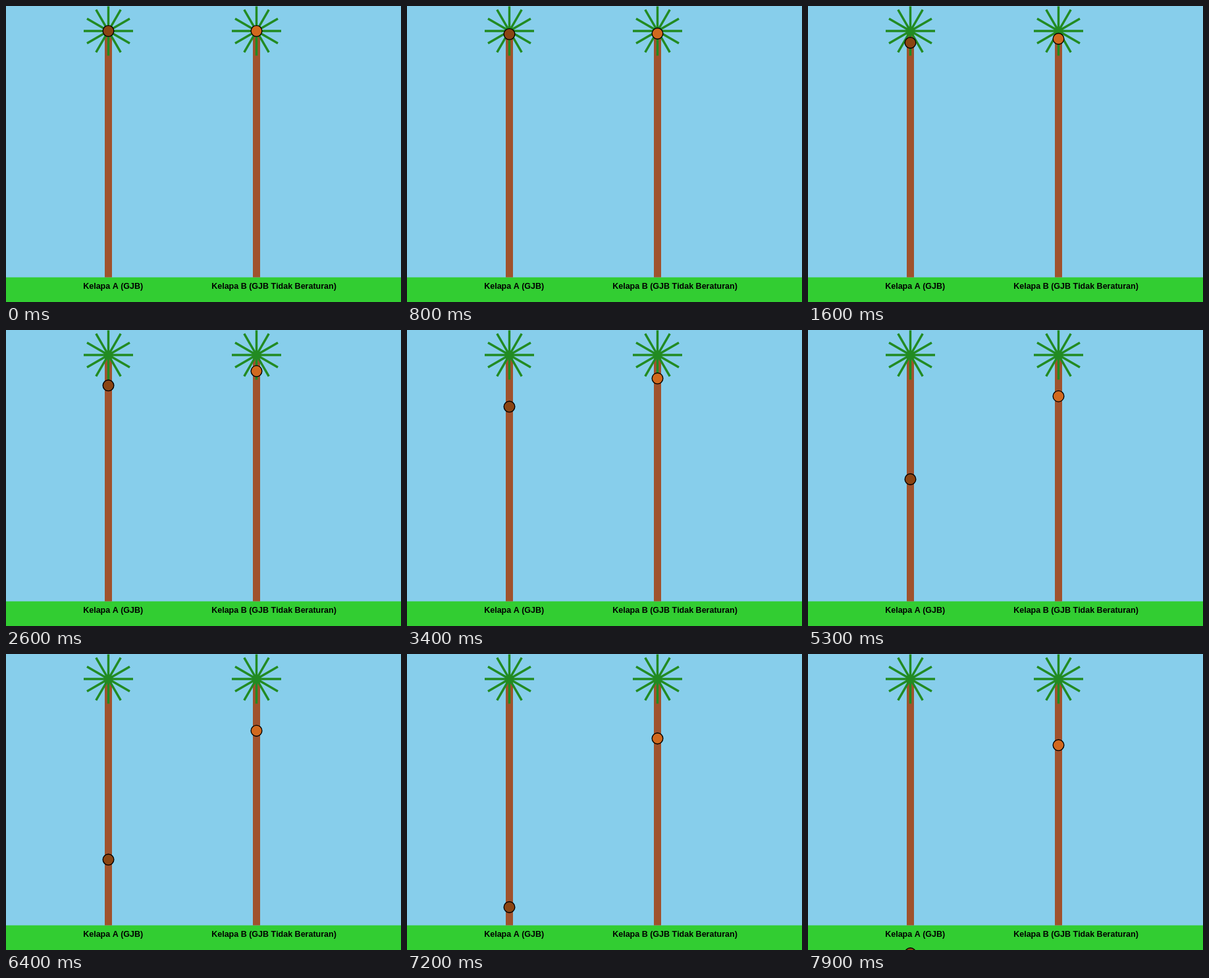
An HTML page with a canvas that plays this animation: 600 px wide and 450 px high, repeating every 8 s.

```html
<!DOCTYPE html>
<html lang="id">
<head>
<meta charset="utf-8">
<title>Kelapa jatuh</title>
<style>
  html, body { margin: 0; width: 100%; height: 100%; overflow: hidden; background: #87ceeb; }
  canvas { display: block; }
</style>
</head>
<body>
<canvas id="stage" width="600" height="450"></canvas>
<script>
const ctx = document.getElementById('stage').getContext('2d');
const LOOP = 8000, STEP = 100;
const GRAVITY = 0.132, DRAG = 0.0905;
const TOP = 38, GROUND = 412.5, FROND = 37.5;

const palms = [
  { x: 155.5, nut: '#8b4513', fall: freeFall, label: 'Kelapa A (GJB)', labelX: 117.2 },
  { x: 380.5, nut: '#d2691e', fall: dragFall, label: 'Kelapa B (GJB Tidak Beraturan)', labelX: 312.2 }
];

// Distance fallen after n steps at constant acceleration.
function freeFall(n) {
  return GRAVITY * n * (n + 1) / 2;
}

// The same fall with linear air drag, levelling off at a terminal speed.
function dragFall(n) {
  const keep = 1 - DRAG;
  return GRAVITY / DRAG * (n - keep / DRAG * (1 - keep ** n));
}

function rect(color, x, y, w, h) {
  ctx.fillStyle = color;
  ctx.fillRect(x, y, w, h);
}

function drawFronds(x) {
  ctx.strokeStyle = '#228b22';
  ctx.lineWidth = 3.47;
  ctx.beginPath();
  for (let i = 0; i < 12; i++) {
    const a = i * Math.PI / 6;
    ctx.moveTo(x, TOP);
    ctx.lineTo(x + FROND * Math.cos(a), TOP + FROND * Math.sin(a));
  }
  ctx.stroke();
}

function drawNut(x, y, color) {
  ctx.beginPath();
  ctx.arc(x, y, 8.33, 0, Math.PI * 2);
  ctx.fillStyle = color;
  ctx.fill();
  ctx.strokeStyle = '#000';
  ctx.lineWidth = 1.39;
  ctx.stroke();
}

function draw(n) {
  rect('#87ceeb', 0, 0, 600, 450);
  rect('#32cd32', 0, GROUND, 600, 450 - GROUND);
  for (const p of palms) {
    rect('#a0522d', p.x - 5.5, TOP, 11, GROUND - TOP);
    drawFronds(p.x);
    drawNut(p.x, TOP + p.fall(n), p.nut);
  }
  ctx.fillStyle = '#000';
  ctx.font = 'bold 12.5px "Liberation Sans", Arial, sans-serif';
  ctx.fontKerning = 'none';
  for (const p of palms) ctx.fillText(p.label, p.labelX, 430);
}

function tick() {
  draw(Math.floor(performance.now() % LOOP / STEP));
  requestAnimationFrame(tick);
}
tick();
</script>
</body>
</html>
```
